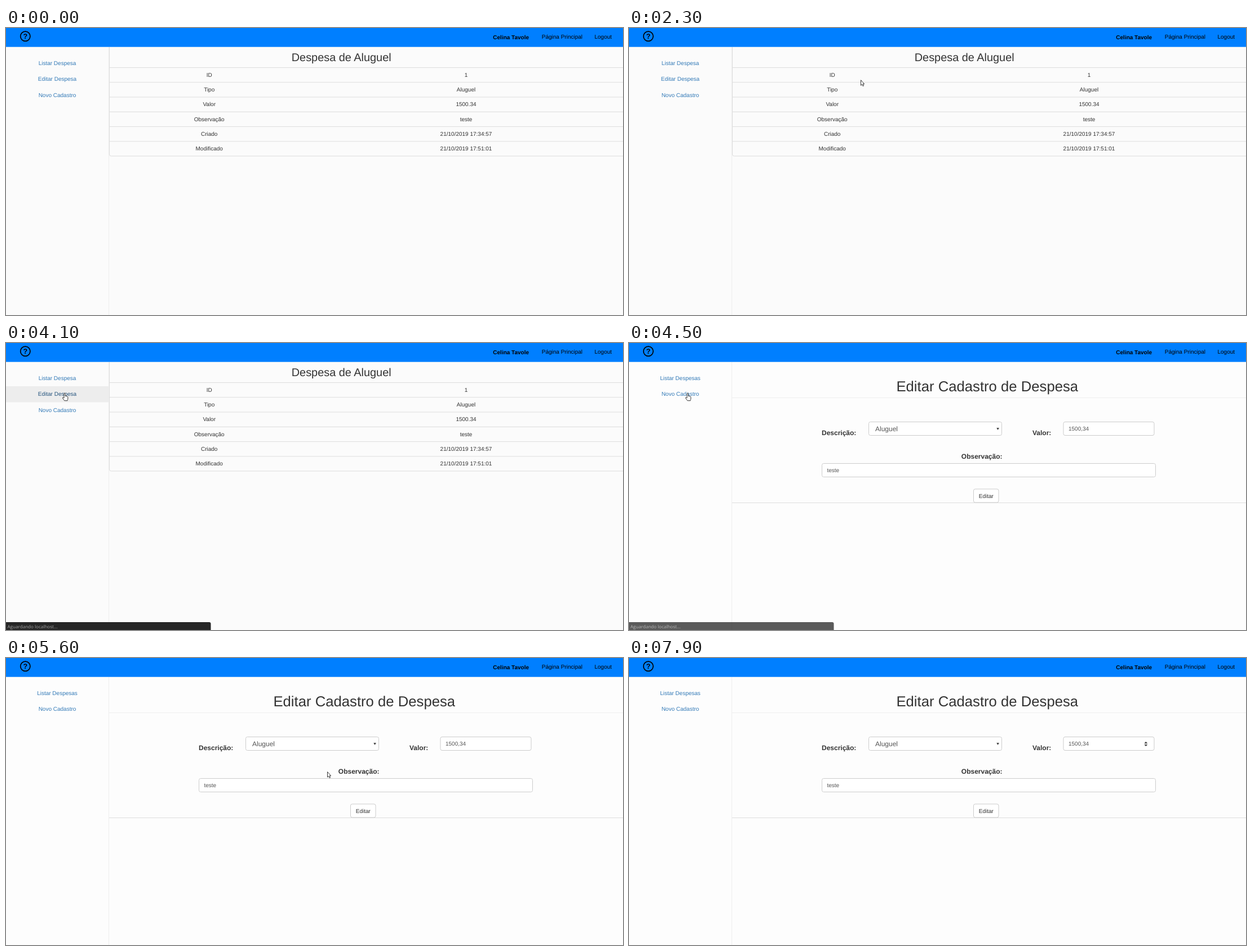
These frames come from a looping animation (1095 by 511 pixels, 8000 ms). An HTML page:

```html
<!DOCTYPE html>
<html lang="pt-BR">
<head>
<meta charset="utf-8">
<title>Despesas</title>
<style>
html, body { margin: 0; width: 100%; height: 100%; overflow: hidden; background: #fbfbfb; }
svg { display: block; width: 1095px; height: 511px; font: 10px "Liberation Sans", Arial, sans-serif; text-rendering: geometricPrecision; }
text { fill: #333; }
.mid { text-anchor: middle; }
.link text { fill: #337ab7; text-anchor: middle; }
.link .over { fill: #23527c; }
.nav text { fill: #000; }
.bold { font-weight: bold; }
.label { font-weight: bold; font-size: 12px; }
.field { fill: #fff; stroke: #ccc; }
.field-text { fill: #555; }
.status { font: 8.1px "Open Sans", "Noto Sans", sans-serif; }
.line { fill: none; stroke: #ddd; }
.soft { stroke: #eee; }

.view, .hover, .hover2, .url, .wait, .spin, .arrow, .hand, .cursor { animation: 8s step-end infinite; }
.view { animation-name: view; }
.view.edit { animation-name: edit; }
.hover { animation-name: hover; }
.hover2 { animation-name: hover2; }
.url { animation-name: url; }
.wait { animation-name: wait; }
.spin { animation-name: spin; }
.arrow { animation-name: arrow; }
.hand { animation-name: hand; }
.cursor { animation-name: move; }

@keyframes view { 0% { opacity: 1 } 52.5%, 100% { opacity: 0 } }
@keyframes edit { 0% { opacity: 0 } 52.5%, 100% { opacity: 1 } }
@keyframes hover { 0% { opacity: 0 } 33.75%, 100% { opacity: 1 } }
@keyframes hover2 { 0% { opacity: 0 } 57.5% { opacity: 1 } 60%, 100% { opacity: 0 } }
@keyframes url { 0% { opacity: 0 } 33.75% { opacity: 1 } 51.25%, 100% { opacity: 0 } }
@keyframes wait { 0% { opacity: 0 } 51.25% { opacity: 1 } 56.25% { opacity: .76 } 57.5% { opacity: .36 } 58.75%, 100% { opacity: 0 } }
@keyframes spin { 0% { opacity: 0 } 81.25% { opacity: 1 } 86.25% { opacity: 0 } 96.25%, 100% { opacity: 1 } }
@keyframes arrow {
  0% { opacity: 0 } 1.25% { opacity: 1 } 33.75% { opacity: 0 } 60% { opacity: 1 }
  81.25% { opacity: 0 } 86.25% { opacity: 1 } 96.25%, 100% { opacity: 0 }
}
@keyframes hand { 0% { opacity: 0 } 33.75% { opacity: 1 } 60%, 100% { opacity: 0 } }

/* the pointer advances once every 100 ms */
@keyframes move {
  0%, 1.25% { transform: translate(28px, 0); animation-timing-function: steps(2) }
  3.75% { transform: translate(562px, 180px) }
  5% { transform: translate(258px, 106px) }
  18.75% { transform: translate(499px, 159px); animation-timing-function: steps(2) }
  21.25% { transform: translate(511px, 157px) }
  25% { transform: translate(535px, 148px) }
  26.25% { transform: translate(562px, 130px); animation-timing-function: steps(4) }
  31.25% { transform: translate(260px, 54px); animation-timing-function: steps(2) }
  33.75% { transform: translate(130px, 84px) }
  35% { transform: translate(104px, 89px) }
  57.5% { transform: translate(112px, 91px) }
  58.75% { transform: translate(150px, 98px) }
  60% { transform: translate(215px, 115px); animation-timing-function: steps(5) }
  66.25% { transform: translate(552px, 190px); animation-timing-function: steps(3) }
  70% { transform: translate(570px, 202px) }
  71.25% { transform: translate(571px, 202px) }
  73.75% { transform: translate(590px, 208px) }
  75% { transform: translate(620px, 211px); animation-timing-function: steps(4) }
  80% { transform: translate(755px, 172px) }
  86.25% { transform: translate(747px, 155px); animation-timing-function: steps(6) }
  93.75% { transform: translate(783px, 181px) }
  95%, 100% { transform: translate(800px, 172px) }
}
</style>
</head>
<body>
<svg viewBox="0 0 1095 511">
  <g class="view">
    <rect width="1095" height="511" fill="#fbfbfb"/>
    <path class="line soft" d="M182.5 34V511"/>
    <path class="line" d="M183.5 34V225q0 3 3 3H1095M184 70.5H1095M184 96.7H1095M184 123H1095M184 149.3H1095M184 175.6H1095M184 201.9H1095"/>
    <text class="mid" x="595.2" y="58.8" font-size="19.9">Despesa de Aluguel</text>
    <g class="mid">
      <text x="360.7" y="87">ID</text><text x="816.5" y="87">1</text>
      <text x="360.7" y="113.2">Tipo</text><text x="816.5" y="113.2">Aluguel</text>
      <text x="360.7" y="139.4">Valor</text><text x="816.5" y="139.4">1500.34</text>
      <text x="360.7" y="165.7">Observação</text><text x="816.5" y="165.7">teste</text>
      <text x="360.7" y="191.9">Criado</text><text x="816.5" y="191.9">21/10/2019 17:34:57</text>
      <text x="360.7" y="218.2">Modificado</text><text x="816.5" y="218.2">21/10/2019 17:51:01</text>
    </g>
    <g class="link">
      <text x="91" y="65.7">Listar Despesa</text>
      <text x="91" y="94.2">Editar Despesa</text>
      <text x="91" y="122.7">Novo Cadastro</text>
      <g class="hover">
        <rect y="77" width="182" height="28.5" fill="#ededed"/>
        <text class="over" x="91" y="94.2">Editar Despesa</text>
      </g>
    </g>
  </g>

  <g class="view edit">
    <rect width="1095" height="511" fill="#fdfdfd"/>
    <path class="line soft" d="M182.5 34V511M183 97.5H1095"/>
    <path class="line" d="M183 284.5H1095"/>
    <text class="mid" x="635.8" y="85.8" font-size="25.7">Editar Cadastro de Despesa</text>
    <text class="label" x="342" y="164">Descrição:</text>
    <rect class="field" x="425.5" y="140.5" width="236" height="24" rx="3"/>
    <text class="field-text" x="437" y="157.2" font-size="12">Aluguel</text>
    <path fill="#444" d="M652.3 151h4.6l-2.3 4z"/>
    <text class="label" x="716" y="164">Valor:</text>
    <rect class="field" x="771" y="140.5" width="161" height="24" rx="3"/>
    <text class="field-text" x="780" y="156">1500,34</text>
    <path class="spin" fill="#444" d="M914.3 152.2h6l-3-3.4zM914.3 153.9h6l-3 3.4z"/>
    <text class="label mid" x="626.2" y="206">Observação:</text>
    <rect class="field" x="342.5" y="214.5" width="592" height="24" rx="3"/>
    <text class="field-text" x="351.5" y="229.8">teste</text>
    <rect class="field" x="611.5" y="260" width="44.5" height="24" rx="3"/>
    <text class="mid" x="633.8" y="275.5">Editar</text>
    <g class="link">
      <text x="91" y="65.7">Listar Despesas</text>
      <text x="91" y="94.2">Novo Cadastro</text>
      <g class="hover2">
        <rect y="77" width="182" height="28.5" fill="#ededed"/>
        <text class="over" x="91" y="94.2">Novo Cadastro</text>
      </g>
    </g>
  </g>

  <g class="nav">
    <rect width="1095" height="33.7" fill="#007fff"/>
    <circle cx="34.3" cy="14.8" r="8.6" fill="none" stroke="#000" stroke-width="1.7"/>
    <text class="bold mid" x="34.3" y="19.4" font-size="12.5">?</text>
    <text class="bold mid" x="896.2" y="19.9">Celina Tavole</text>
    <text x="950.8" y="18.8">Página Principal</text>
    <text x="1044.5" y="18.8">Logout</text>
  </g>

  <g class="status">
    <g class="url">
      <path fill="#262626" d="M0 497H132.5q3 0 3 3V511H0z"/>
      <text x="2.5" y="507.6" style="fill:#c0c0c0">localhost/projeto/despesas/edit/1</text>
    </g>
    <g class="wait">
      <path fill="#262626" d="M0 497H360.5q3 0 3 3V511H0z"/>
      <text x="2.5" y="507.6" style="fill:#a4a4a4">Aguardando localhost...</text>
    </g>
  </g>

  <g class="cursor" fill="#fff" stroke="#222" stroke-width=".9" stroke-linejoin="round">
    <path class="arrow" d="M.5.7V10.2L2.6 8.3 4.1 11.5 5.6 10.8 4.2 7.7H6.7z"/>
    <path class="hand" d="M-1 9V1.3a1.1 1.1 0 0 1 2.2 0V5.2l3 .6q1.6.4 1.6 2V10q0 1.5-.8 2.6V13.7H-.2L-3.5 9.3q-.4-1.6.8-1.4z"/>
  </g>
</svg>
</body>
</html>
```
